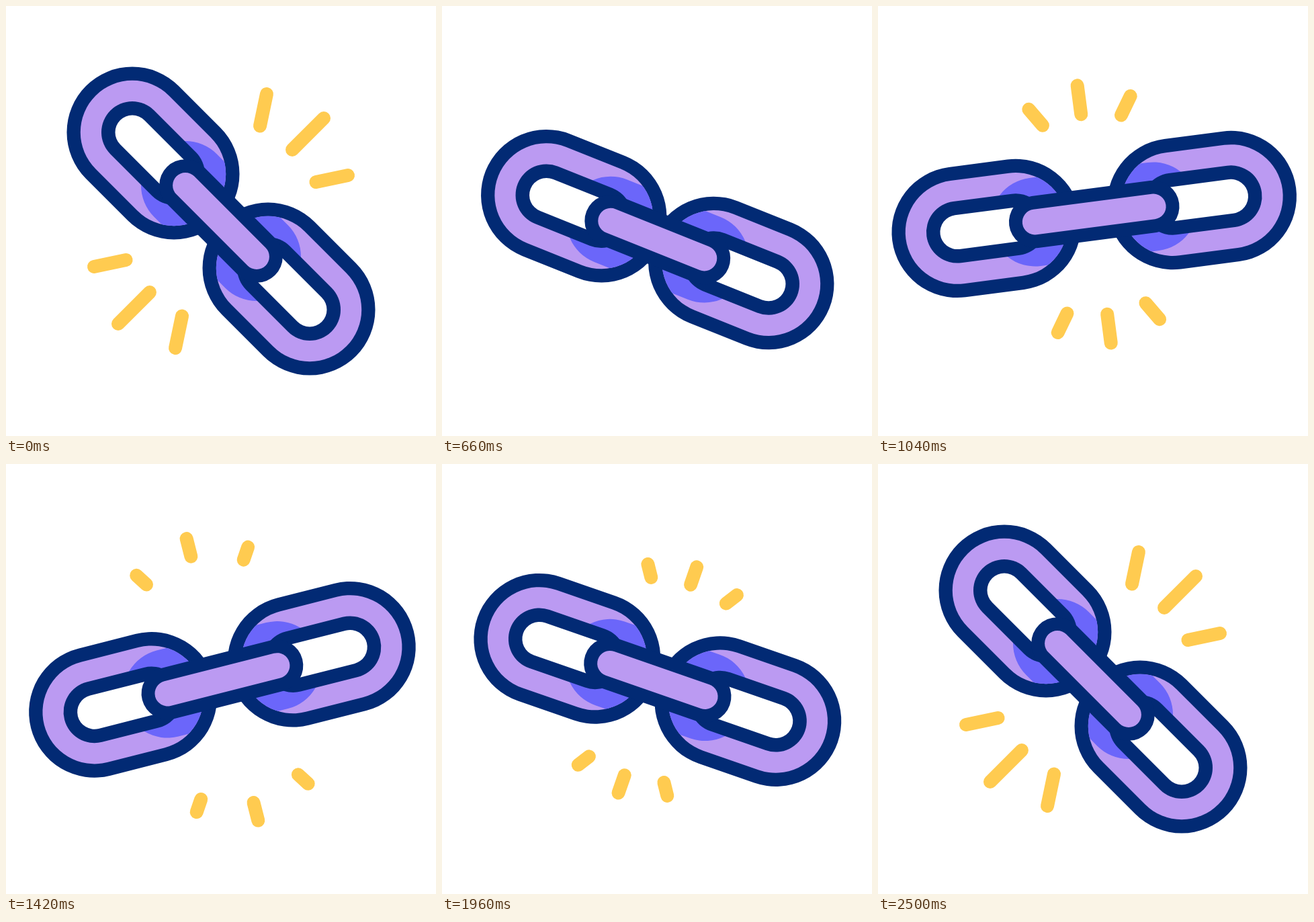
An HTML page with a canvas for the animation above (3000 ms loop, 640 by 640 pixels).

```html
<!DOCTYPE html>
<html lang="en">
<head>
<meta charset="utf-8">
<title>Chain link</title>
<style>
  html, body { margin: 0; height: 100%; overflow: hidden; background: #fff; }
  canvas { display: block; width: 100vw; height: 100vh; }
</style>
</head>
<body>
<canvas id="stage" width="640" height="640"></canvas>
<script>
const ctx = document.getElementById('stage').getContext('2d');
const LOOP = 3000;
const NAVY = '#022a74', PURPLE = '#bb9af2', SHADE = '#6b66fa', YELLOW = '#ffcb50';
const LINK_LENGTH = 87.7;

const mix = (a, b, k) => a + (b - a) * k;

// Smooth 0 to 1 between two times
function ease(t, start, end) {
  const u = Math.min(1, Math.max(0, (t - start) / (end - start)));
  return u * u * (3 - 2 * u);
}

// Follows [time, value] keys, easing between neighbours
function follow(t, keys) {
  let value = keys[0][1];
  for (let i = 1; i < keys.length; i++) {
    value += (keys[i][1] - keys[i - 1][1]) * ease(t, keys[i - 1][0], keys[i][0]);
  }
  return value;
}

// Chain pose: rest, squeezed together, stretched in the air, squeezed, rest
const pose = (t, rest, squeezed, stretched, landing) => follow(t, [
  [200, rest], [480, squeezed], [720, squeezed], [1200, stretched],
  [landing, squeezed], [1720, squeezed], [2000, rest]
]);

function capsulePath(x1, x2, r) {
  ctx.beginPath();
  ctx.roundRect(x1 - r, -r, x2 - x1 + 2 * r, 2 * r, r);
}

function capsule(x1, x2, r, color) {
  capsulePath(x1, x2, r);
  ctx.fillStyle = color;
  ctx.fill();
}

function drawLink(reach, barHalf) {
  const from = -reach, to = LINK_LENGTH - reach;
  capsule(from, to, 97.5, NAVY);
  capsule(from, to, 77.2, PURPLE);
  ctx.save();
  capsulePath(from, to, 77.2);
  ctx.clip();
  capsule(-barHalf, barHalf, 66, SHADE);
  ctx.restore();
  capsule(from, to, 46, NAVY);
  capsule(from, to, 25.5, '#fff');
}

// Visible part of each ray runs from fraction a to fraction b
function drawSparks(a, b) {
  if (b - a < 0.001) return;
  const ray = (x1, y1, x2, y2) => {
    ctx.moveTo(mix(x1, x2, a), mix(y1, y2, a));
    ctx.lineTo(mix(x1, x2, b), mix(y1, y2, b));
  };
  ctx.beginPath();
  ray(0, -150, 0, -216.4);
  for (const side of [-1, 1]) ray(side * 59, -141, side * 85.6, -181.7);
  ctx.strokeStyle = YELLOW;
  ctx.lineWidth = 20;
  ctx.lineCap = 'round';
  ctx.stroke();
}

function draw(t) {
  const turn = follow(t, [[200, 0], [1300, 1], [2500, 0]]);
  const y = pose(t, 320, 347.6, 297, 1660);
  const reach = pose(t, 186.7, 178, 215, 1640);
  const barHalf = pose(t, 75, 75, 93.5, 1640);

  const sparks = t < 700 ? [ease(t, 200, 480), 1]
    : t < 1700 ? [ease(t, 1220, 1580), ease(t, 800, 1200)]
    : [0, ease(t, 1800, 2160)];

  ctx.setTransform(1, 0, 0, 1, 0, 0);
  ctx.fillStyle = '#fff';
  ctx.fillRect(0, 0, 640, 640);
  ctx.translate(320 + 2 * turn, y);
  ctx.rotate((45 - 61 * turn) * Math.PI / 180);

  for (let half = 0; half < 2; half++) {
    drawSparks(...sparks);
    drawLink(reach, barHalf);
    ctx.rotate(Math.PI);
  }
  capsule(-barHalf, barHalf, 38.8, NAVY);
  capsule(-barHalf, barHalf, 18.9, PURPLE);
}

const start = performance.now();
function tick() {
  draw((performance.now() - start) % LOOP);
  requestAnimationFrame(tick);
}
tick();
</script>
</body>
</html>
```
